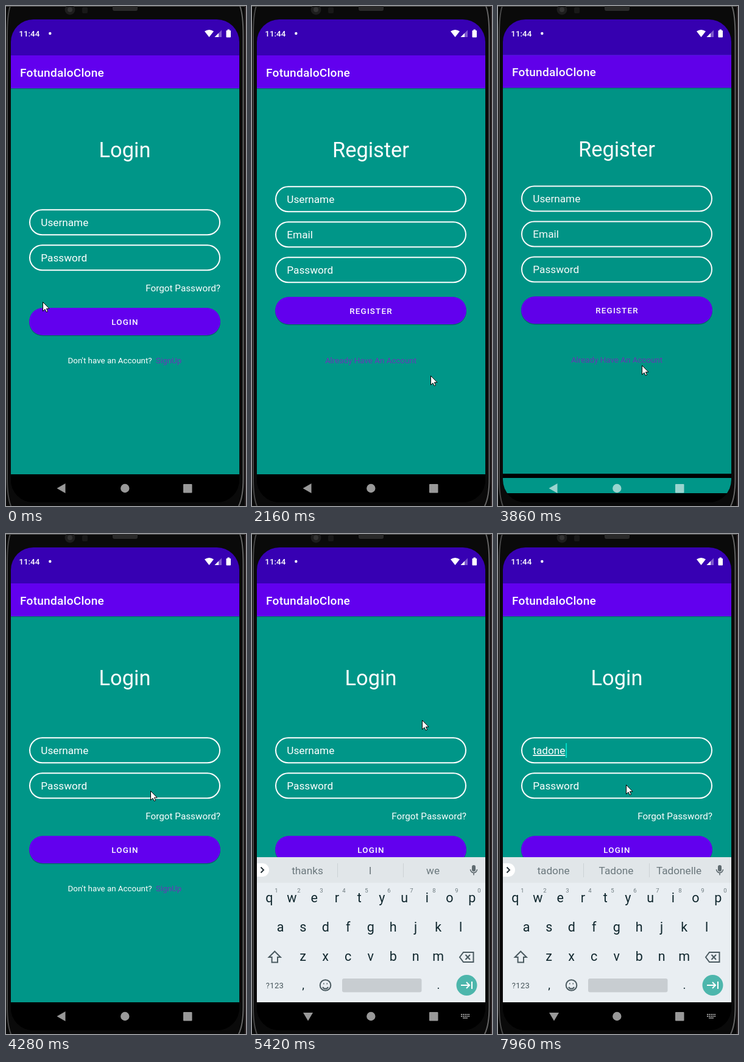
An HTML page for the animation above (8000 ms loop, 394x820 px).

```html
<!DOCTYPE html>
<html lang="en">
<head>
<meta charset="utf-8">
<title>Login demo</title>
<style>
  html, body { margin: 0; width: 100%; height: 100%; overflow: hidden; background: #0a0a0a; }
  svg { display: block; }
  text { font-family: Roboto, "Noto Sans", sans-serif; white-space: pre; }
  .line { fill: none; stroke-width: 2; }
</style>
</head>
<body>
<svg id="stage" width="394" height="820" viewBox="0 0 394 820"></svg>
<script>
const LOOP = 8000;
const stage = document.getElementById("stage");

// Pointer tip: time, x, y
const pointerSteps = [
  [0, 60, 485], [500, 35, 473], [640, 70, 505], [760, 150, 555], [880, 245, 600],
  [1000, 325, 628], [1120, 365, 634], [1240, 315, 612], [1360, 268, 585],
  [2010, 275, 592], [2160, 293, 606], [2280, 311, 625], [2420, 320, 630],
  [2920, 295, 616], [3070, 257, 598], [3220, 240, 588], [3340, 224, 581],
  [3490, 225, 580], [3860, 236, 589], [4160, 238, 520], [4280, 237, 421],
  [4430, 222, 400], [4550, 202, 378], [4670, 190, 365], [4920, 205, 350],
  [5040, 250, 322], [5160, 276, 308], [5280, 279, 305], [7460, 257, 316],
  [7600, 240, 345], [7720, 225, 378], [7840, 214, 402], [7960, 210, 411]
];

// Time, typed text, second and third suggestion
const typingSteps = [
  [0, "", "I", "we"], [6170, "t", "T", "to"], [6290, "ta", "Ta", "tap"],
  [6540, "tad", "Tad", "tap"], [6660, "tadon", "Tadone", "Tadonelle"],
  [6910, "tadone", "Tadone", "Tadonelle"]
];

// Time, page, then for a page change: page below, its lift and dim, drop and top edge of the new page
const pageSteps = [
  [0, "login"],
  [1860, "register", "login", 1, 0.05, 31, 696],
  [2010, "register", "login", 8, 0.1, 7, 22],
  [2160, "register"],
  [3860, "login", "register", 0.8, 0.02, 31, 774],
  [4010, "login", "register", 8, 0.1, 9, 22],
  [4160, "login"]
];

const at = (steps, t) => steps.filter(s => s[0] <= t).pop();

const text = (x, y, str, size, attrs = "") =>
  `<text x="${x}" y="${y}" font-size="${size}" fill="#fff" ${attrs}>${str}</text>`;
const mid = (x, y, str, size, style = "") =>
  text(x, y, str, size, `text-anchor="middle" style="${style}"`);
const rect = (x, y, w, h, fill, r = 0, attrs = "") =>
  `<rect x="${x}" y="${y}" width="${w}" height="${h}" rx="${r}" fill="${fill}" ${attrs}/>`;
const path = (d, attrs) => `<path d="${d}" ${attrs}/>`;
const move = (y, body, attrs = "") => `<g transform="translate(0 ${y})" ${attrs}>${body}</g>`;

const field = (y, label, attrs) =>
  rect(39, y + 1.3, 312, 41, "none", 20.5, 'stroke="#fff" stroke-width="2"') +
  text(57.3, y + 28.3, label, 17.2, attrs);

const button = (y, label) =>
  rect(38, y + 1.5, 314, 45, "#000", 22.5, 'opacity=".25"') +
  rect(38, y, 314, 45, "#6200ee", 22.5) +
  mid(195.5, y + 27.7, label, 13.37, "font-weight:500;letter-spacing:.0893em");

const login = typed =>
  mid(195, 248, "Login", 34.4) +
  field(333, typed || "Username", `id="user" ${typed ? 'text-decoration="underline"' : ""}`) +
  field(391, "Password") +
  text(352, 467.7, "Forgot Password?", 15.28, 'text-anchor="end"') +
  button(495, "LOGIN") +
  text(101.5, 585.5, "Don't have an Account?", 13.37) +
  text(246, 585.5, "SignUp", 13.37, 'style="fill:#673ab7"');

const register = () =>
  mid(195, 248, "Register", 34.4) +
  field(295, "Username") + field(353, "Email") + field(411, "Password") +
  button(477, "REGISTER") +
  mid(195, 585.5, "Already Have An Account", 13.37, "fill:#673ab7");

function page(name, typed) {
  return rect(8, 22, 375, 59, "#3700b3") +
    rect(8, 81, 375, 687, "#009688") +
    rect(8, 135, 375, 1, "#000", 0, 'opacity=".2"') +
    rect(8, 136, 375, 1, "#000", 0, 'opacity=".08"') +
    rect(8, 81, 375, 54, "#6200ee") +
    text(23, 115.5, "FotundaloClone", 19.1, 'font-weight="500" letter-spacing=".0125em"') +
    (name === "login" ? login(typed) : register()) +
    rect(8, 768, 375, 90, "#000");
}

function pages(t, typed) {
  const [, top, below, lift, dim, drop, edge] = at(pageSteps, t);
  if (!below) return page(top, typed);
  return move(-lift, page(below)) +
    rect(8, 22, 375, 800, "#000", 0, `opacity="${dim}"`) +
    `<clipPath id="reveal">${rect(0, edge, 394, 820 - edge, "#000")}</clipPath>` +
    `<g clip-path="url(#reveal)">${move(drop, page(top))}</g>`;
}

function keyboard(typed, second, third) {
  const ink = "fill:#10272e", soft = "fill:#6b787d", icon = 'class="line" stroke="#4a5a60"';
  const row = (keys, x, y) =>
    [...keys].map((k, i) => mid(x + i * 37, y, k, 21.5, ink)).join("");
  const digits = [..."1234567890"].map((d, i) => mid(40 + i * 37, 588, d, 9.5, soft)).join("");
  return rect(8, 530, 375, 238, "#e9eef2") +
    rect(8, 530, 375, 42, "#e1e6e9") +
    rect(8, 540, 20, 22, "#fff", 0, 'clip-path="inset(0 0 0 0 round 0 11px 11px 0)"') +
    path("M14.5 546.5l4.5 4.5-4.5 4.5", 'class="line" stroke="#263238"') +
    [typed || "thanks", second, third].map((w, i) => mid(91 + i * 103, 557.5, w, 17.2, soft)).join("") +
    rect(140, 540, 1, 23, "#ccd2d5") + rect(248, 540, 1, 23, "#ccd2d5") +
    rect(361, 543, 6, 10.5, "#5f6b70", 3) +
    path("M358.5 550a5.5 5.5 0 0 0 11 0M364 555.5v4", 'class="line" stroke="#5f6b70" style="stroke-width:1.6"') +
    row("qwertyuiop", 28.3, 603.5) + digits +
    row("asdfghjkl", 46.7, 651.5) + row("zxcvbnm", 83.7, 699.5) +
    path("M37.3 684.5l9.5 9.5h-4.8v8.5h-9.4v-8.5h-4.8z", icon) +
    path("M341 694l6-8h16.500v16H347zM350.500 690l7.500 8m0-8l-7.500 8", icon) +
    mid(37.5, 745, "?123", 13, "fill:#45545a;letter-spacing:.03em") +
    mid(84, 746, ",", 19, ink) + mid(306, 746, ".", 19, ink) +
    `<circle cx="120.500" cy="740" r="8.800" ${icon}/>` +
    path("M116 743a5 5 0 0 0 9 0M117 737.500h1.500M122.500 737.500h1.500", icon) +
    rect(148, 729, 130.5, 22.5, "#c8cdd1", 3) +
    '<circle cx="352.500" cy="740" r="17" fill="#4db6ac"/>' +
    path("M343 740h14m-5-5l5 5-5 5M361 734v12", 'class="line" stroke="#fff"');
}

function navIcons(open) {
  const dots = [0, 1, 2, 3, 4].map(i =>
    rect(343 + i * 3, 787, 2, 2, "#fff") + rect(343 + i * 3, 790, 2, 2, "#fff")).join("");
  return `<g fill="#fff" opacity=".6">` +
    path(open ? "M84 785h16l-8 13.500z" : "M97.500 783v16l-14-8z", "") +
    '<circle cx="195.300" cy="791" r="7.200"/>' +
    rect(291, 784, 14.5, 14.5, "#fff", 1) +
    (open ? dots + rect(346, 793, 8, 1.5, "#fff") : "") + "</g>";
}

const statusBar =
  text(21.3, 50.3, "11:44", 13.4, 'font-weight="500"') +
  '<circle cx="72.300" cy="45" r="2.200" fill="#fff"/>' +
  path("M326 41.500Q333.500 36.500 341 41.500L333.500 51z", 'fill="#fff"') +
  path("M354 39.500V51H342.500z", 'fill="#fff" opacity=".35"') +
  path("M349 44.500V51H342.500z", 'fill="#fff"') +
  rect(361.5, 40, 7.5, 11.5, "#fff", 1) + rect(363.5, 38.5, 3.5, 2, "#fff");

const phone =
  rect(0, 0, 394, 820, "#0a0a0a") +
  rect(0, 0, 394, 1, "#555") +
  path("M7 0Q2 14 2 50V775Q2 805 8 820", 'class="line" stroke="#484848"') +
  path("M384 0Q389.500 14 389.500 50V775Q389.500 805 382 820", 'class="line" stroke="#656565"') +
  rect(392, 0, 2, 820, "#2b2325") +
  '<circle cx="105" cy="6" r="8.500" fill="#1d1d1d"/><circle cx="105" cy="6" r="4" fill="#333"/>' +
  rect(125, 2, 9, 10, "#181818", 2) +
  rect(175, -4, 41, 12, "#2a2a2a", 3);

const clip = `<clipPath id="screen">${rect(8, 22, 375, 792, "#000", 37)}</clipPath>`;

function caret(t) {
  const hidden = t < 4920 || (t >= 5420 && t < 5920) || (t >= 7460 && t < 7960);
  return hidden ? "" : rect(57.2, 343, 2, 24, "#03dac5", 0, 'id="caret"');
}

function scene(t) {
  const [, typed, second, third] = at(typingSteps, t);
  const [, x, y] = at(pointerSteps, t);
  const open = t >= 5160, rising = t < 5280;
  const keys = open
    ? move(rising ? 73 : 0, keyboard(typed, second, third), `opacity="${rising ? 0.5 : 1}"`) : "";
  return clip + phone +
    `<g clip-path="url(#screen)">${rect(8, 22, 375, 792, "#000")}` +
    pages(t, typed) + caret(t) + keys + navIcons(open) + statusBar + "</g>" +
    `<path transform="translate(${x} ${y})" d="M.5 .5V15.500L4 12.300 6.300 17 8.600 16 6.400 11.300H11z" fill="#fff" stroke="#000"/>`;
}

let shown = "";
function draw(now) {
  const t = now % LOOP;
  const next = scene(t);
  if (next !== shown) {
    stage.innerHTML = shown = next;
    const bar = document.getElementById("caret");
    if (bar && at(typingSteps, t)[1]) {
      bar.setAttribute("x", 58 + document.getElementById("user").getComputedTextLength());
    }
  }
}

const start = performance.now();
function tick() {
  draw(performance.now() - start);
  requestAnimationFrame(tick);
}
tick();
</script>
</body>
</html>
```
